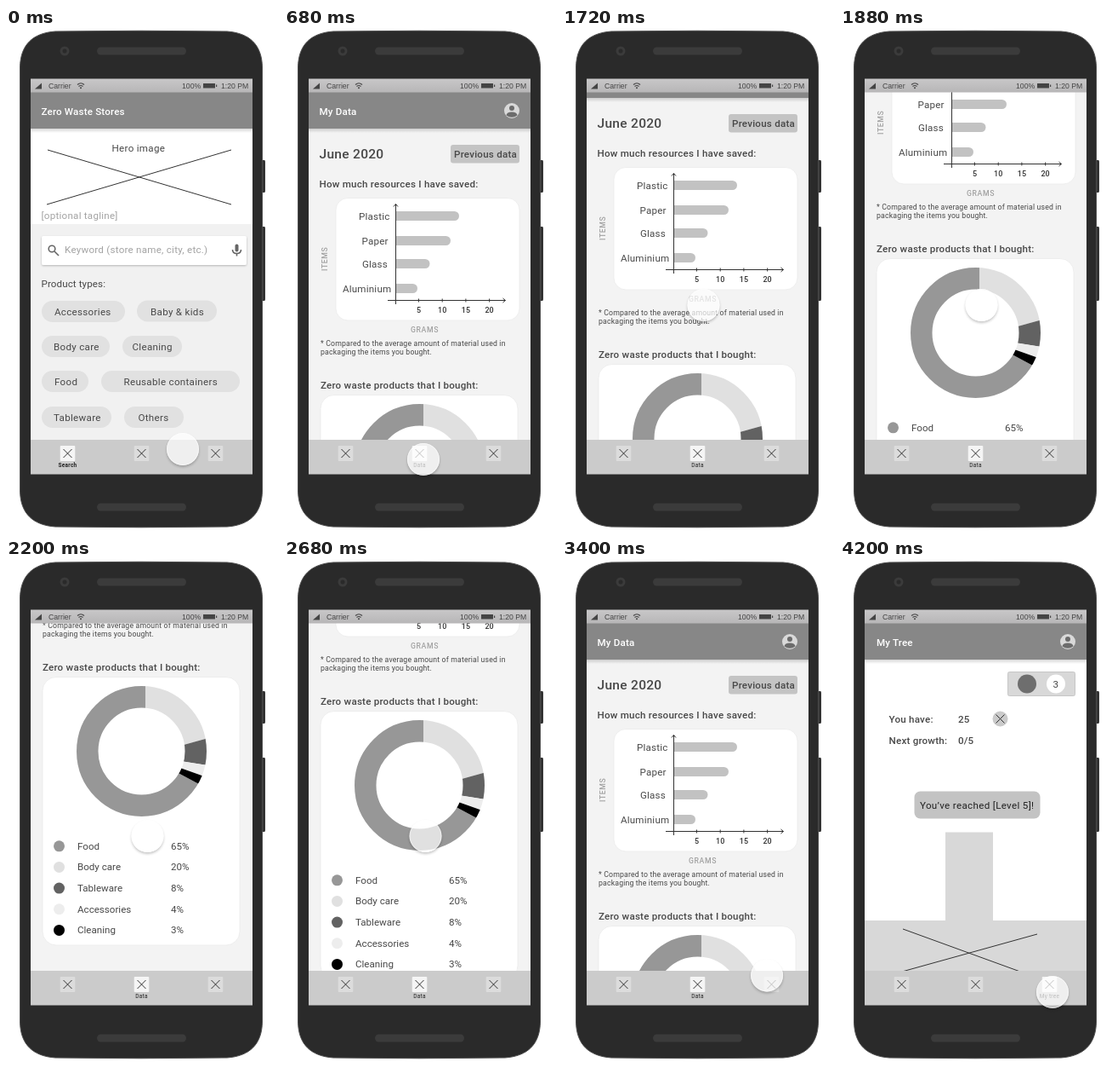
Animation of 320x590 px, one loop 4240 ms. Source, as an HTML page:

```html
<!DOCTYPE html>
<html lang="en">
<head>
<meta charset="utf-8">
<title>Zero waste app prototype</title>
<style>
html, body { margin: 0; width: 100%; height: 100%; overflow: hidden; background: #fff; }
svg { display: block; width: 320px; height: 590px; }
text { font: 11.6px Roboto, sans-serif; fill: #484848; letter-spacing: .3px; }
.medium { font-weight: 500; letter-spacing: .22px; }
.title { font-weight: 500; letter-spacing: .18px; fill: #fff; }
.status { font: 8.7px "Liberation Sans", sans-serif; letter-spacing: 0; fill: #444; }
.axis { font-size: 8.7px; font-weight: 500; letter-spacing: .6px; fill: #a2a2a2; }
.tick { font-size: 9px; font-weight: 500; letter-spacing: 0; fill: #333; text-anchor: middle; }
.note { font-size: 8.7px; letter-spacing: .17px; }
.legend { letter-spacing: 0; }
.hint { fill: #a3a3a3; letter-spacing: .25px; }
.tab { font-size: 6.5px; letter-spacing: .25px; fill: #222; text-anchor: middle; }
.line { fill: none; stroke: #333; stroke-width: 1; }
</style>
</head>
<body>
<svg viewBox="0 0 320 590">
  <defs>
    <linearGradient id="statusFill" x2="0" y2="1">
      <stop stop-color="#c8c7c8"/><stop offset="1" stop-color="#b7b6b7"/>
    </linearGradient>
    <linearGradient id="fade" x2="0" y2="1">
      <stop stop-color="#000" stop-opacity=".16"/><stop offset="1" stop-color="#000" stop-opacity="0"/>
    </linearGradient>
    <filter id="shadow" x="-30%" y="-30%" width="160%" height="170%">
      <feDropShadow dx="0" dy="1" stdDeviation="1" flood-opacity=".25"/>
    </filter>
    <filter id="blur" x="-30%" y="-30%" width="160%" height="160%"><feGaussianBlur stdDeviation="1.5"/></filter>
    <mask id="outside">
      <rect x="-40" y="-40" width="80" height="80" fill="#fff"/><circle r="19"/>
    </mask>
    <mask id="ring">
      <circle cx="159.500" cy="517.500" r="63.750" fill="none" stroke="#fff" stroke-width="25.500"/>
    </mask>
    <clipPath id="view"><rect x="29" y="75" width="261" height="408"/></clipPath>
    <g id="cross"><path class="line" d="M-5-5 5 5M5-5-5 5"/></g>
    <g id="avatar">
      <circle cx="268" cy="97" r="9" fill="#d9d9d9"/>
      <circle cx="268" cy="94" r="3" fill="#6c6c6c"/>
      <path d="M261.500 102.500Q262 98.500 268 98.500T274.500 102.500Q268 107 261.500 102.500" fill="#6c6c6c"/>
    </g>
  </defs>

  <!-- phone -->
  <path d="M301 155h3q1 0 1 2v34q0 2-1 2h-3zM301 233h3q1 0 1 2v83q0 2-1 2h-3z" fill="#333"/>
  <path d="M16.500 46C17 20 31 6 58 4Q159 2.500 260 4C287 6 301 20 301.500 46V543C301 569 287 583 260 585Q159 586.500 58 585C31 583 17 569 16.500 543Z" fill="#2a2a2a" stroke="#4c4c4c"/>
  <g fill="#3b3b3b">
    <rect x="107" y="22.500" width="105" height="9" rx="4.500"/>
    <rect x="107" y="557.500" width="105" height="9" rx="4.500"/>
    <circle cx="69" cy="27" r="5.500"/>
  </g>
  <circle cx="69" cy="27" r="2.500" fill="#2a2a2a"/>

  <g clip-path="url(#view)">
    <g id="pages"></g>
  </g>

  <!-- status bar -->
  <rect x="29" y="59.500" width="261" height="16" fill="url(#statusFill)"/>
  <path d="M34 71.500h8v-7z" fill="#444"/>
  <text class="status" x="50" y="70.500">Carrier</text>
  <path d="M84 66.500q4-3.500 8 0M85.500 68.500q2.500-2 5 0" fill="none" stroke="#444" stroke-width="1.200"/>
  <circle cx="88" cy="70.300" r="1" fill="#444"/>
  <text class="status" x="207" y="70.500">100%</text>
  <path d="M232 65h14v5.500h-14zM247 66.500h1.200v2.500h-1.200z" fill="#444"/>
  <text class="status" x="253" y="70.500">1:20 PM</text>

  <rect x="29" y="483" width="261" height="40.500" fill="#cbcbcb"/>
  <g id="tabs"></g>

  <circle id="ripple" fill="none" stroke="#fff" stroke-width="2"/>
  <g id="cursor">
    <circle cy="2" r="19" fill="#000" opacity=".22" filter="url(#blur)" mask="url(#outside)"/>
    <circle r="19" fill="#fff" fill-opacity=".7"/>
    <circle r="18.500" fill="none" stroke="#fff" stroke-opacity=".55"/>
  </g>
</svg>

<script>
const $ = id => document.getElementById(id);
const text = (x, y, s, cls = "", extra = "") => `<text x="${x}" y="${y}" class="${cls}" ${extra}>${s}</text>`;
const rect = (x, y, x2, y2, fill, r = 0, extra = "") =>
  `<rect x="${x}" y="${y}" width="${x2 - x}" height="${y2 - y}" rx="${r}" fill="${fill}" ${extra}/>`;
const circle = (x, y, r, fill) => `<circle cx="${x}" cy="${y}" r="${r}" fill="${fill}"/>`;
const line = d => `<path class="line" d="${d}"/>`;
const cross = (x, y) => `<use href="#cross" x="${x}" y="${y}"/>`;
const header = (title, x, avatar) => rect(29, 118, 290, 123, "url(#fade)") + rect(29, 75, 290, 118, "#878787") +
  text(x, 101.500, title, "title") + (avatar ? '<use href="#avatar"/>' : "");

function searchPage() {
  const chips = [
    [42, 140, 320, 57, "Accessories"], [154, 248, 319.500, 170, "Baby &amp; kids"],
    [42, 122, 361, 56, "Body care"], [137, 207, 361, 148.500, "Cleaning"],
    [42, 97, 402, 57, "Food"], [112, 275, 402, 138.500, "Reusable containers"],
    [42, 124, 444, 56, "Tableware"], [139, 209, 444, 155.500, "Others"]
  ];
  return rect(29, 75, 290, 230, "#fff") + rect(29, 230, 290, 483, "#f1f1f1") + header("Zero Waste Stores", 41.500) +
    line("M49 143 265 207M265 143 48 207") + text(124.500, 145, "Hero image") +
    text(41.500, 224, "[optional tagline]", "hint") +
    rect(42, 244, 283, 278, "#fff", 2, 'filter="url(#shadow)"') +
    '<g fill="none" stroke="#666" stroke-width="1.600"><circle cx="54" cy="259" r="3.800"/><path d="M57 262l5 5"/>' +
    '<path d="M266.500 260q0 4.500 5 4.500t5-4.500M271.500 264.500v3"/></g>' +
    rect(269.500, 253.500, 273.500, 262.500, "#666", 2) +
    text(69, 264, "Keyword (store name, city, etc.)", "hint") +
    text(41.500, 303.500, "Product types:", "", 'style="letter-spacing:.1px"') +
    chips.map(([x, x2, y, tx, s]) => rect(x, y, x2, y + 25, "#e1e1e1", 12.500) + text(tx, y + 17, s)).join("");
}

// The slices meet a little off the ring's own centre.
function slice(from, to, fill) {
  const at = deg => {
    const a = deg * Math.PI / 180;
    return `${164 + 120 * Math.sin(a)} ${522.5 - 120 * Math.cos(a)}`;
  };
  return `<path fill="${fill}" d="M164 522.500L${at(from)}A120 120 0 ${+(to - from > 180)} 1 ${at(to)}Z"/>`;
}

function dataPage() {
  const bars = [["Plastic", 88, 220.500, 206], ["Paper", 91.500, 249.500, 196],
    ["Glass", 92, 276.500, 171.500], ["Aluminium", 69, 305.500, 157]];
  const shares = [["Food", 65, "#979797", 118, 360], ["Body care", 20, "#e0e0e0", 0, 74.500],
    ["Tableware", 8, "#626262", 74.500, 99], ["Accessories", 4, "#ededed", 99, 109.500], ["Cleaning", 3, "#000", 109.500, 118]];
  const edge = 'stroke="#e8e8e8" stroke-width=".7"';
  return rect(29, 75, 290, 780, "#f3f3f3") + header("My Data", 41.500, true) +
    text(41.500, 153, "June 2020", "medium", 'style="font-size:15.5px;letter-spacing:.3px"') +
    rect(196, 137, 277, 158.500, "#c4c4c4", 3) + text(200, 152, "Previous data", "medium") +
    text(41.500, 186.500, "How much resources I have saved:", "medium") +
    rect(61, 199.500, 277, 343, "#fff", 14, edge) +
    bars.map(([s, x, y, end]) => text(x, y + 4, s, "", 'style="letter-spacing:.2px"') +
      `<path fill="#c2c2c2" d="M131.500 ${y - 5.500}H${end - 5.500}a5.500 5.500 0 0 1 0 11H131.500z"/>`).join("") +
    line("M131.500 324V206.500M129 209.500l2.500-3 2.500 3M122 319.500H260.500M257.500 317l3 2.500-3 2.500") +
    [5, 10, 15, 20].map((n, i) => line(`M${158.500 + 27.700 * i} 317.500v4`) + text(158.500 + 27.700 * i, 333.500, n, "tick")).join("") +
    text(0, 0, "ITEMS", "axis", 'transform="translate(51 285) rotate(-90)"') + text(149, 357, "GRAMS", "axis") +
    text(43, 373, "* Compared to the average amount of material used in", "note") +
    text(43, 383, "packaging the items you bought.", "note") +
    text(43, 423, "Zero waste products that I bought:", "medium") +
    rect(43, 430.500, 275, 745, "#fff", 16, edge) +
    `<g mask="url(#ring)">${shares.map(([, , fill, from, to]) => slice(from, to, fill)).join("")}</g>` +
    shares.map(([s, n, fill], i) => {
      const y = 628.800 + 24.650 * i;
      return circle(62.500, y, 6.500, fill) + text(84, y + 4, s, "legend") + text(194, y + 4, n + "%", "legend");
    }).join("");
}

function treePage() {
  return rect(29, 75, 290, 483, "#fff") + header("My Tree", 43, true) +
    rect(197.500, 132.500, 276.500, 160.500, "#d8d8d8", 2, 'stroke="#c6c6c6"') +
    circle(220, 146.500, 11, "#6e6e6e") + circle(254, 146.500, 11, "#fff") + text(250.500, 151, "3") +
    text(57.500, 191.500, "You have:", "medium") + text(139, 191.500, "25", "medium") +
    text(57.500, 216.500, "Next growth:", "medium") + text(139, 216.500, "0/5", "medium") +
    circle(188.500, 187.500, 9, "#cacaca") + cross(188.500, 187.500) +
    rect(87.500, 272.500, 235.500, 304.500, "#c3c3c3", 7) +
    text(94, 292.500, "You’ve reached [Level 5]!", "", 'style="fill:#222;letter-spacing:.33px"') +
    rect(124, 320.500, 180, 424, "#d8d8d8") + rect(29, 424, 290, 483, "#d8d8d8") +
    line("M74 434 212 484M73 484 232 440");
}

$("pages").innerHTML = [searchPage(), dataPage(), treePage()].map(p => `<g>${p}</g>`).join("");
const tabX = [72.500, 159.500, 246.500];
const tabSets = ["Search", "Data", "My tree"].map((label, active) => "<g>" +
  tabX.map((x, i) => rect(x - 8.800, 490, x + 8.800, 508, i === active ? "#f5f5f5" : "#dcdcdc", 1) + cross(x, 499)).join("") +
  text(tabX[active], 515, label, "tab", active ? "" : 'style="font-weight:700"') + "</g>");
$("tabs").innerHTML = tabSets.join("");

const LOOP = 4240, MAX_SCROLL = 292;
const path = [[0, 208, 494], [360, 164, 506], [1130, 164, 506], [1338, 166.500, 325],
  [3146, 166.500, 325], [3466, 250, 508], [LOOP, 250, 508]];
const clicks = [[400, 164, 506], [3480, 250, 508]];
const progress = (t, start, length) => Math.min(1, Math.max(0, (t - start) / length));
const smooth = u => u * u * (3 - 2 * u);
const easeOut = u => 1 - (1 - u) ** 1.6;

function cursorAt(t) {
  const i = path.findIndex(p => p[0] > t);
  const [t0, x0, y0] = path[i - 1], [t1, x1, y1] = path[i];
  const k = smooth((t - t0) / (t1 - t0));
  return [x0 + (x1 - x0) * k, y0 + (y1 - y0) * k];
}

function draw(t) {
  const page = t < 600 ? 0 : t < 3640 ? 1 : 2;
  for (const id of ["pages", "tabs"])
    [...$(id).children].forEach((g, i) => g.style.display = i === page ? "" : "none");

  const scroll = Math.round(MAX_SCROLL * (easeOut(progress(t, 1680, 513)) - easeOut(progress(t, 2634, 528))));
  $("pages").children[1].setAttribute("transform", `translate(0 ${-scroll})`);
  $("cursor").setAttribute("transform", `translate(${cursorAt(t)})`);

  const click = clicks.find(([start]) => t >= start && t < start + 240);
  const ripple = $("ripple");
  ripple.style.display = click ? "" : "none";
  if (click) {
    const u = progress(t, click[0], 240);
    ripple.setAttribute("cx", click[1]);
    ripple.setAttribute("cy", click[2]);
    ripple.setAttribute("r", 19 + 30 * easeOut(u));
    ripple.setAttribute("opacity", .5 * (1 - u));
  }
}

const start = performance.now();
function tick() {
  draw((performance.now() - start) % LOOP);
  requestAnimationFrame(tick);
}
tick();
</script>
</body>
</html>
```
